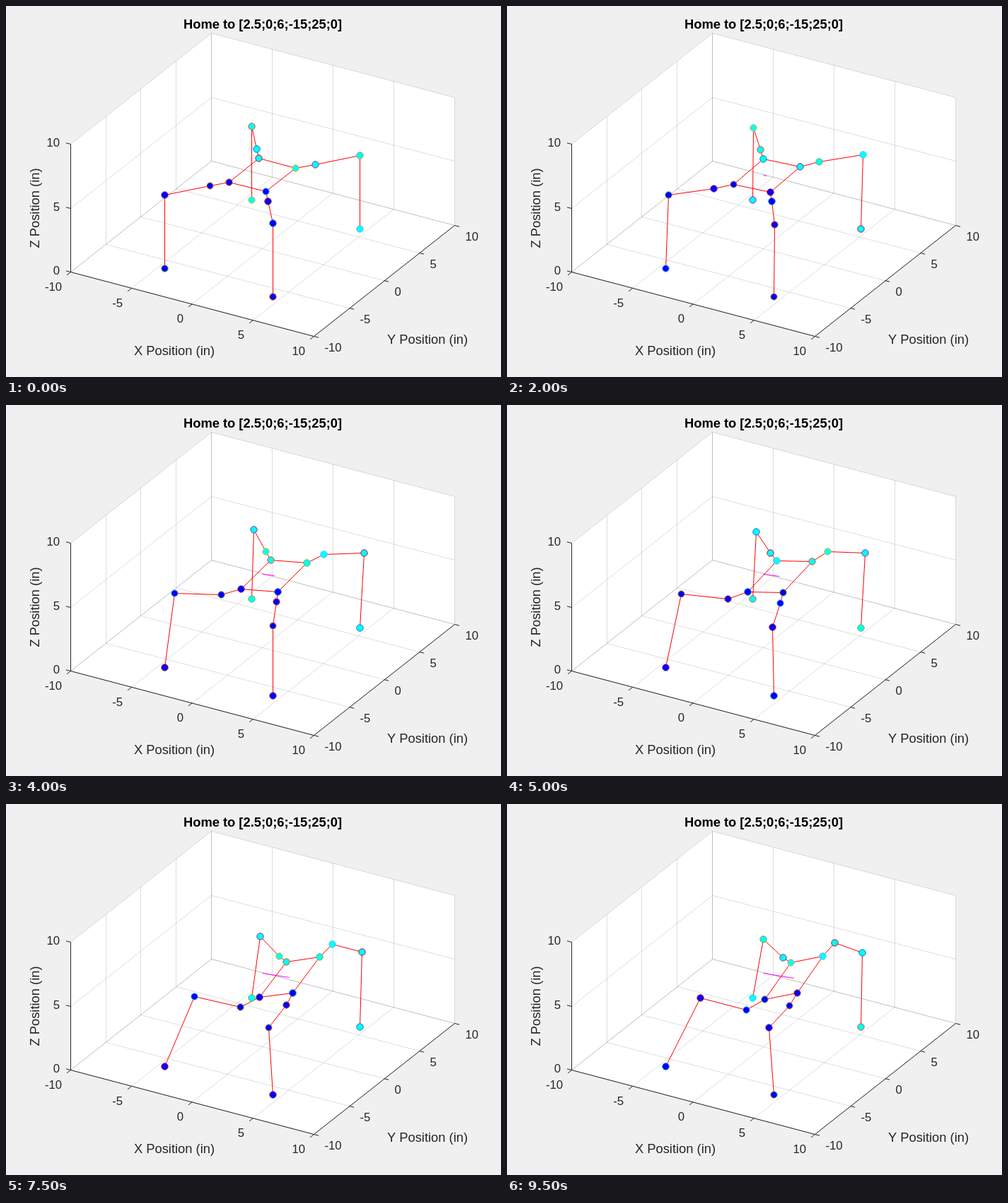
Recreate the animation shown at these times as an HTML page with a canvas. Size 700 by 525 pixels, loop 10000 ms.

```html
<!DOCTYPE html>
<html>
<head>
<meta charset="utf-8">
<style>
html, body { margin: 0; width: 100%; height: 100%; overflow: hidden; background: #f0f0f0; }
canvas { display: block; }
</style>
</head>
<body>
<canvas id="stage" width="700" height="525"></canvas>
<script>
const ctx = document.getElementById('stage').getContext('2d');
const STEP = 500, FRAMES = 20;
const COXA = 1.5, FEMUR = 3.5, TIBIA = 5.75;
const HALF = [1.515, 2.12], FOOT = [4.45, 6.165];
const START = [0, 0, 5.75], MOVE = [2.5, 0, 0.25];
const SIDES = [[-1, -1], [1, -1], [1, 1], [-1, 1]];
const EDGES = ['#0072bd', '#d95319', '#edb120', '#7e2f8e', '#77ac30', '#4dbeee', '#a2142f'];
const TICKS = [-10, -5, 0, 5, 10];

// Screen position, snapped to pixel centres
const project = ([x, y, z]) => [
  362.75 + 17.2 * x + 9.95 * y,
  343.4 + 4.53 * x - 7.85 * y - 18.1 * z
].map(v => Math.floor(v) + 0.5);
const add = (a, b) => a.map((v, i) => v + b[i]);
const sub = (a, b) => a.map((v, i) => v - b[i]);
const scale = (a, k) => a.map(v => v * k);
const dot = (a, b) => a[0] * b[0] + a[1] * b[1] + a[2] * b[2];
const cross = (a, b) => [
  a[1] * b[2] - a[2] * b[1],
  a[2] * b[0] - a[0] * b[2],
  a[0] * b[1] - a[1] * b[0]
];

function trace(points, closed) {
  ctx.beginPath();
  points.forEach(p => ctx.lineTo(...project(p)));
  if (closed) ctx.closePath();
}

function line(color, ...points) {
  trace(points);
  ctx.strokeStyle = color;
  ctx.stroke();
}

function label(text, x, y, size = 16.7, align = 'center', style = '', color = '#262626') {
  ctx.font = `${style} ${size}px "Liberation Sans", Arial, sans-serif`;
  ctx.textAlign = align;
  ctx.textBaseline = 'alphabetic';
  ctx.fillStyle = color;
  ctx.fillText(text, x, y + size * 0.36);
}

function tick(point, dx, dy) {
  const [x, y] = project(point);
  ctx.beginPath();
  ctx.moveTo(x, y);
  ctx.lineTo(x + dx, y + dy);
  ctx.stroke();
  return [x, y];
}

function drawAxes() {
  ctx.fillStyle = '#f0f0f0';
  ctx.fillRect(0, 0, 700, 525);
  ctx.lineWidth = 1;
  const faces = [
    [[-10, -10, 0], [10, -10, 0], [10, 10, 0], [-10, 10, 0]],
    [[-10, -10, 0], [-10, 10, 0], [-10, 10, 10], [-10, -10, 10]],
    [[-10, 10, 0], [10, 10, 0], [10, 10, 10], [-10, 10, 10]]
  ];
  ctx.fillStyle = '#fff';
  for (const face of faces) {
    trace(face, true);
    ctx.fill();
  }
  const grid = 'rgba(38,38,38,.15)', dark = '#262626';
  for (const v of TICKS) {
    line(grid, [v, -10, 0], [v, 10, 0], [v, 10, 10]);
    line(grid, [10, v, 0], [-10, v, 0], [-10, v, 10]);
  }
  for (const z of [0, 5, 10]) line(grid, [-10, -10, z], [-10, 10, z], [10, 10, z]);

  line(dark, [-10, -10, 10], [-10, -10, 0], [10, -10, 0], [10, 10, 0]);
  for (const v of TICKS) {
    let [x, y] = tick([v, -10, 0], -5.5, 4.3);
    label(v, x - 12.5, y + 20.5, 16.7, 'right');
    [x, y] = tick([10, v, 0], 6.6, 1.7);
    label(v, x + 15, y + 15, 16.7, 'left');
  }
  for (const z of [0, 5, 10]) {
    const [, y] = tick([-10, -10, z], -6.6, -1.7);
    label(z, 76, y - 2.5, 16.7, 'right');
  }
  label('X Position (in)', 238, 487, 18.33);
  label('Y Position (in)', 596, 471, 18.33);
  ctx.save();
  ctx.translate(40, 286);
  ctx.rotate(-Math.PI / 2);
  label('Z Position (in)', 0, 0, 18.33);
  ctx.restore();
  label('Home to [2.5;0;6;-15;25;0]', 363, 25, 18.33, 'center', 'bold', '#000');
}

// Body axes after turning about the fixed tilt axis
function bodyAxes(s) {
  const tilt = [15, -25, 0], size = Math.hypot(...tilt);
  const axis = scale(tilt, 1 / size), angle = s * size * Math.PI / 180;
  const c = Math.cos(angle), n = Math.sin(angle);
  return [[1, 0, 0], [0, 1, 0], [0, 0, 1]].map(v =>
    add(add(scale(v, c), scale(cross(axis, v), n)), scale(axis, dot(axis, v) * (1 - c))));
}

// Joints from hip to planted foot: the coxa stays in the body plane,
// the knee bends in the upright plane through coxa and foot
function solveLeg([sx, sy], center, [ex, ey]) {
  const inBody = (x, y) => add(scale(ex, x), scale(ey, y));
  const hip = add(center, inBody(sx * HALF[0], sy * HALF[1]));
  const foot = [sx * FOOT[0], sy * FOOT[1], 0];
  const [dx, dy] = sub(foot, hip);
  const k = COXA / Math.hypot(dx, dy);
  const coxa = add(hip, inBody(dx * k, dy * k));

  const [x, y, h] = sub(foot, coxa);
  const r = Math.hypot(x, y), reach = Math.hypot(r, h);
  const bend = Math.acos((reach ** 2 + FEMUR ** 2 - TIBIA ** 2) / (2 * FEMUR * reach));
  const lift = Math.atan2(h, r) + bend, run = Math.cos(lift) / r;
  const knee = add(coxa, scale([x * run, y * run, Math.sin(lift)], FEMUR));
  return [hip, coxa, knee, foot];
}

function drawRobot(frame) {
  const u = frame / (FRAMES - 1), s = u * u * (3 - 2 * u);
  const center = add(START, scale(MOVE, s)), axes = bodyAxes(s);
  const legs = SIDES.map(side => solveLeg(side, center, axes));
  line('#f0f', START, center);
  const hips = legs.map(leg => leg[0]);
  line('#f00', ...hips, hips[0]);
  legs.forEach(leg => line('#f00', ...leg));
  for (const i of [2, 3, 0, 1]) {
    legs[i].forEach((joint, j) => {
      ctx.beginPath();
      ctx.arc(...project(joint), 4.7, 0, 2 * Math.PI);
      ctx.fillStyle = i < 2 ? '#00f' : '#0ff';
      ctx.fill();
      ctx.strokeStyle = EDGES[(1 + frame * 16 + i * 4 + j) % EDGES.length];
      ctx.stroke();
    });
  }
}

function draw() {
  drawAxes();
  drawRobot(Math.floor(performance.now() / STEP) % FRAMES);
  requestAnimationFrame(draw);
}
draw();
</script>
</body>
</html>
```
